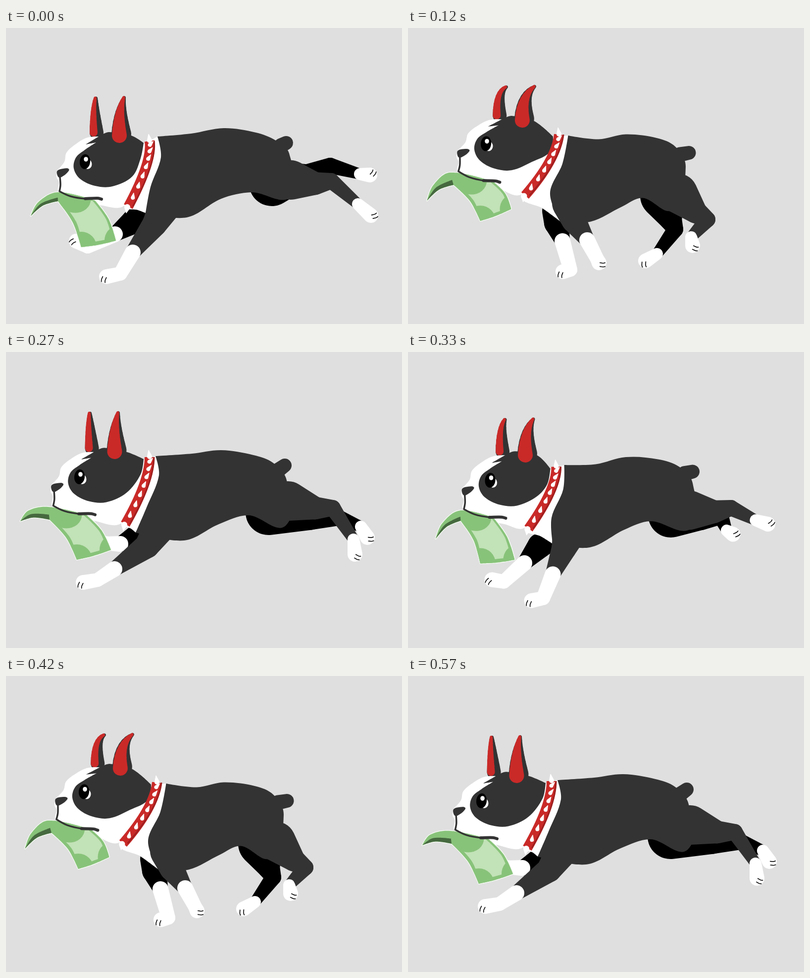
Recreate the animation shown at these times as an HTML page with a canvas. Size 800 px wide and 600 px high, loop 600 ms.

```html
<!DOCTYPE html>
<html lang="en">
<head>
<meta charset="utf-8">
<title>Running dog</title>
<style>
html, body { margin: 0; width: 100%; height: 100%; overflow: hidden; background: #dfdfdf; }
canvas { display: block; }
</style>
</head>
<body>
<canvas id="stage" width="800" height="600"></canvas>
<script>
const ctx = document.getElementById('stage').getContext('2d');
const STEP = 30, STEPS = 10, TAU = Math.PI * 2;
const DARK = '#333', RED = '#c92a28', GREEN = '#88c37a', LIGHT = '#c2e2b7';

// Joints of the rig in its key poses; a star marks a sharp corner.
const KEYS = { 4: [0, 2, 6, 9], 6: [0, 2, 4, 6, 8, 9] };
const rig = {
  // neck, back, rump, groin, belly, chest tip, shoulder
  torso: [
    '306,220* 374,214 440,203 505,212 545,228 572,254 575,342 496,333 435,346 365,384 282,375* 292,322 313,262',
    '325,238* 384,241 440,223 505,223 552,238 578,277 570,372 483,353 440,374 370,408 303,403* 288,350 314,295',
    '322,198* 386,210 440,208 500,223 528,243 544,285 500,365 465,336 425,350 368,377 312,381* 286,320 310,255',
    '302,211* 376,206 435,199 500,209 540,225 567,260 565,352 490,331 430,349 360,382 262,366* 284,315 309,250'],
  // eye, end of the mouth, ear tip, tail tip
  marks: [
    '160,271 193,347 239,141 566,233', '173,249 202,327 268,131 584,252',
    '143,220 169,299 244,106 551,254', '149,253 180,330 227,123 563,230'],
  // top, bend, bottom
  collar: ['290,229 296,270 247,362', '309,236 305,285 240,354', '301,196 293,250 233,325', '290,213 290,263 241,349'],
  // flap tip, peak, fold, and the other three corners
  note: [
    '50,381 104,333 105,351 180,350 222,431 152,444', '62,376 105,310 108,333 165,322 209,411 140,413',
    '15,324 65,276 76,303 180,302 208,323 152,369', '29,343 85,314 88,340 162,330 212,401 143,421'],
  // hip, hock, ankle, toe
  nearHind: [
    '575,308 657,310 711,357 737,380', '560,333 648,322 694,325 717,318', '545,335 605,388 572,424 575,441',
    '505,330 555,407 541,480 518,492', '545,315 632,395 650,480 627,491', '570,302 660,316 702,380 705,410'],
  farHind: [
    '537,315 655,279 715,296 735,298', '525,345 609,388 573,428 578,441', '515,340 540,408 503,458 480,472',
    '508,330 512,410 490,469 466,477', '530,320 595,410 603,465 580,478', '530,325 672,336 717,354 730,376'],
  // elbow, sock, wrist, toe
  nearFore: [
    '300,398 256,455 231,498 203,504', '330,398 329,446 315,500 296,504', '335,390 362,430 382,468 386,476',
    '336,392 314,402 280,401 267,416', '300,390 245,425 205,438 185,440', '285,393 219,440 185,462 156,467'],
  farFore: [
    '258,392 220,418 165,443 142,432', '275,393 250,438 222,488 197,491', '300,395 312,432 328,490 313,494',
    '325,385 350,420 402,460 414,456', '270,385 258,400 222,405 218,412', '256,382 231,389 205,388 200,388']
};

const parse = text => text.split(' ').map(word => {
  const [x, y] = word.split(',').map(parseFloat);
  return { x, y, sharp: word.endsWith('*') };
});
for (const name in rig) rig[name] = rig[name].map(parse);

const lerp = (a, b, t) => a + (b - a) * t;
const mix = (a, b, t) => ({ x: lerp(a.x, b.x, t), y: lerp(a.y, b.y, t), sharp: a.sharp && b.sharp });
const move = (p, x, y) => ({ x: p.x + x, y: p.y + y, sharp: p.sharp });
const sharp = p => ({ ...p, sharp: true });
const bend = (a, b, c, t) => mix(mix(a, b, t), mix(b, c, t), t);

function pose(name, k) {
  const list = rig[name], keys = KEYS[list.length];
  const i = keys.findLastIndex(key => key <= k);
  if (keys[i] === k) return list[i];
  const gap = keys[i + 1] - keys[i];
  const t = ((k - keys[i]) / gap) ** (gap === 3 ? 1.7 : 1); // slow push-off
  return list[i].map((p, n) => mix(p, list[i + 1][n], t));
}

// Smooth curve through the points, broken at sharp ones.
function curve(pts, closed = true) {
  const n = pts.length, path = new Path2D();
  const at = i => closed ? pts[(i + n) % n] : pts[Math.max(0, Math.min(n - 1, i))];
  const handle = (i, len) => {
    const p = at(i), a = at(i - 1), b = at(i + 1);
    const s = p.sharp ? 0 : len / 3 / (Math.hypot(b.x - a.x, b.y - a.y) || 1);
    return [(b.x - a.x) * s, (b.y - a.y) * s];
  };
  path.moveTo(pts[0].x, pts[0].y);
  for (let i = 0; i < (closed ? n : n - 1); i++) {
    const p = at(i), q = at(i + 1), len = Math.hypot(q.x - p.x, q.y - p.y);
    const [ax, ay] = handle(i, len), [bx, by] = handle(i + 1, len);
    path.bezierCurveTo(p.x + ax, p.y + ay, q.x - bx, q.y - by, q.x, q.y);
  }
  if (closed) path.closePath();
  return path;
}

function fill(pts, color) {
  ctx.fillStyle = color;
  ctx.fill(curve(pts));
}

function line(pts, color, width) {
  ctx.strokeStyle = color;
  ctx.lineWidth = width;
  ctx.stroke(curve(pts, false));
}

function oval(p, rx, ry, color, turn = 0) {
  ctx.fillStyle = color;
  ctx.beginPath();
  ctx.ellipse(p.x, p.y, rx, ry, turn, 0, TAU);
  ctx.fill();
}

// Two circles joined by their outer tangents.
function bone(a, ra, b, rb, color) {
  const d = Math.hypot(b.x - a.x, b.y - a.y);
  if (d <= Math.abs(ra - rb)) return ra > rb ? oval(a, ra, ra, color) : oval(b, rb, rb, color);
  const dir = Math.atan2(b.y - a.y, b.x - a.x), open = Math.acos((ra - rb) / d);
  ctx.fillStyle = color;
  ctx.beginPath();
  ctx.arc(a.x, a.y, ra, dir + open, dir - open + TAU);
  ctx.arc(b.x, b.y, rb, dir - open, dir + open);
  ctx.fill();
}

function limb(joints, radii, color) {
  for (let i = 1; i < joints.length; i++) bone(joints[i - 1], radii[i - 1], joints[i], radii[i], color);
}

function toes(from, toe, r) {
  const d = Math.hypot(toe.x - from.x, toe.y - from.y) || 1;
  const dx = (toe.x - from.x) / d, dy = (toe.y - from.y) / d;
  const sx = (dx * .5 + dy) * .85, sy = (dy * .5 - dx) * .85;
  for (const side of [0, 8]) {
    const p = move(toe, dx * 4 - sy * (side - 4), dy * 4 + sx * (side - 4));
    line([p, move(p, sx * 7 - sy, sy * 7 + sx), move(p, sx * (r - 3), sy * (r - 3))], '#111', 1.7);
  }
}

function leg(joints, radii, color, ankle) {
  limb(joints.slice(0, ankle + 1), radii, color);
  limb(joints.slice(ankle), radii.slice(ankle).map(r => r + 1), '#fff');
  toes(joints.at(-2), joints.at(-1), radii.at(-1));
}

function hindLeg([hip, hock, ankle, toe], thigh, color) {
  const knee = move(mix(hip, hock, .6), 0, 6);
  leg([hip, knee, hock, ankle, toe], [thigh, 23, 16, 11, 14], color, 3);
}

function foreLeg(shoulder, width, joints, color) {
  leg([shoulder, ...joints], [width, 25, 15, 13, 14], color, 2);
}

function ear(base, tip, wide, color, dx = 0) {
  const mid = move(base, -4, -48), count = 8, joints = [], radii = [];
  for (let i = 0; i <= count; i++) {
    const t = i / count;
    joints.push(move(bend(base, mid, tip, t), dx * (1 - t * .7), 0));
    radii.push(lerp(wide, 3, t));
  }
  limb(joints, radii, color);
}

function drawCollar([top, mid, end]) {
  const strap = (dx, color, width) => {
    ctx.strokeStyle = color;
    ctx.lineWidth = width;
    ctx.beginPath();
    ctx.moveTo(top.x + dx, top.y);
    ctx.quadraticCurveTo(mid.x + dx, mid.y, end.x + dx, end.y);
    ctx.stroke();
  };
  ctx.lineCap = 'butt';
  strap(0, RED, 20);
  strap(9, '#9f2020', 3);
  ctx.lineCap = 'round';
  limb([move(top, 0, -1), move(top, -2, -14)], [5, .5], '#fff');
  limb([move(end, -2, 1), move(end, -4, 13)], [6, .5], '#fff');
  for (let i = 0; i < 7; i++) {
    const p = bend(top, mid, end, .09 + i * .135), turn = -.8 - i * .1;
    limb([p, move(p, Math.cos(turn) * 10, Math.sin(turn) * 10)], [4, .5], '#fff');
  }
}

function drawNote(corners) {
  const [tip, peak, fold, right, low, left] = corners.map(sharp);
  const bow = (a, b) => move({ ...mix(a, b, .5), sharp: false }, 6, -4);
  const soft = (a, b, t, x, y) => move({ ...mix(a, b, t), sharp: false }, x, y);
  const over = soft(tip, peak, .35, -4, -11), under = soft(tip, fold, .5, -3, -6);
  const bowR = bow(right, low), bowL = bow(fold, left), foot = soft(low, left, .5, 0, 2);
  const outline = [tip, over, { ...peak, sharp: false }, right, bowR, low, foot, left, bowL, fold, under];
  const shape = curve(outline);
  ctx.strokeStyle = '#f4faf2';
  ctx.lineWidth = 3;
  ctx.stroke(shape);
  fill(outline, GREEN);
  ctx.save();
  ctx.clip(shape);
  const inset = (a, b, up) => mix(mix(a, b, .08), up, .06);
  fill([mix(fold, right, .1), mix(right, fold, .07), mix(bowR, bowL, .07),
    inset(low, left, right), inset(left, low, fold), mix(bowL, bowR, .1)], LIGHT);
  oval(mix(mix(fold, peak, .5), right, .45), 33, 29, GREEN, .2);
  oval(left, 31, 31, GREEN);
  oval(low, 23, 28, GREEN);
  ctx.restore();
  fill([tip, mix(under, over, .5), mix(fold, peak, .4), fold, under], '#46693f');
}

function draw(k) {
  const torso = pose('torso', k), collar = pose('collar', k);
  const [eye, chin, tip, tail] = pose('marks', k);
  const tilt = Math.atan2(chin.y - eye.y, chin.x - eye.x) - Math.atan2(76, 33);
  const cos = Math.cos(tilt), sin = Math.sin(tilt);
  // Points given from the eye, turned with the head.
  const onHead = text => parse(text).map(p => move(eye, p.x * cos - p.y * sin, p.x * sin + p.y * cos))
    .map((p, i) => ({ ...p, sharp: parse(text)[i].sharp }));
  const [top, , end] = collar, [neck] = torso, [breast, shoulder, nape] = torso.slice(-3);

  ctx.fillStyle = '#dfdfdf';
  ctx.fillRect(0, 0, 800, 600);

  hindLeg(pose('farHind', k), 46, '#000');
  foreLeg(move(shoulder, 8, 36), 24, pose('farFore', k), '#000');
  fill([sharp(move(top, -12, 6)), neck, move(nape, 10, 0), move(shoulder, 10, 0),
    breast, mix(breast, end, .5), move(end, -8, 0)], '#fff');
  fill(torso, DARK);
  limb([mix(torso[4], torso[5], .4), tail], [15, 14], DARK);
  hindLeg(pose('nearHind', k), 40, DARK);
  foreLeg(move(shoulder, 40, 20), 36, pose('nearFore', k), DARK);

  const [nearBase, farBase] = onHead('73,-56 23,-59');
  const farTip = move(tip, -57, 1);
  ear(farBase, farTip, 14, DARK);
  ear(farBase, farTip, 8, RED, -6);
  fill([...onHead('40,-50 5,-49 -20,-35 -38,-18 -42,0 -56,17* -58,31 -53,41 -54,60 -30,75 30,88'),
    move(end, -8, -2), mix(end, top, .5), sharp(move(top, -10, 6))], '#fff');
  fill([...onHead('32,-54* 1,-35* 22,-39* -2,-23 -19,-8 -23,14 -10,35 20,49 55,50 95,30'),
    move(top, -18, 35), sharp(move(top, -12, 4)), ...onHead('93,-53 48,-60')], DARK);
  ear(nearBase, tip, 20, DARK);
  ear(move(nearBase, 0, 3), tip, 15, RED, -4);
  drawCollar(collar);

  oval(move(eye, 5, 5), 8.5, 10, '#fff');
  oval(move(eye, -.5, 0), 10.5, 15, '#000', .1);
  oval(move(eye, 1.5, -5), 4.3, 4.8, '#fff');
  fill(onHead('-56,18 -44,14 -33,15 -36,22 -46,30 -53,32 -57,25'), DARK);
  drawNote(pose('note', k));
  const mouth = onHead('-51,31 -50,47 -52,60* -30,70 0,75 25,74 33,76');
  line(mouth, DARK, 3.5);
  line(mouth.slice(4), DARK, 6);
}

ctx.lineCap = ctx.lineJoin = 'round';
const start = performance.now();
let shown = -1;
function tick() {
  const k = Math.floor((performance.now() - start) / STEP) % STEPS;
  if (k !== shown) draw(shown = k);
  requestAnimationFrame(tick);
}
tick();
</script>
</body>
</html>
```
